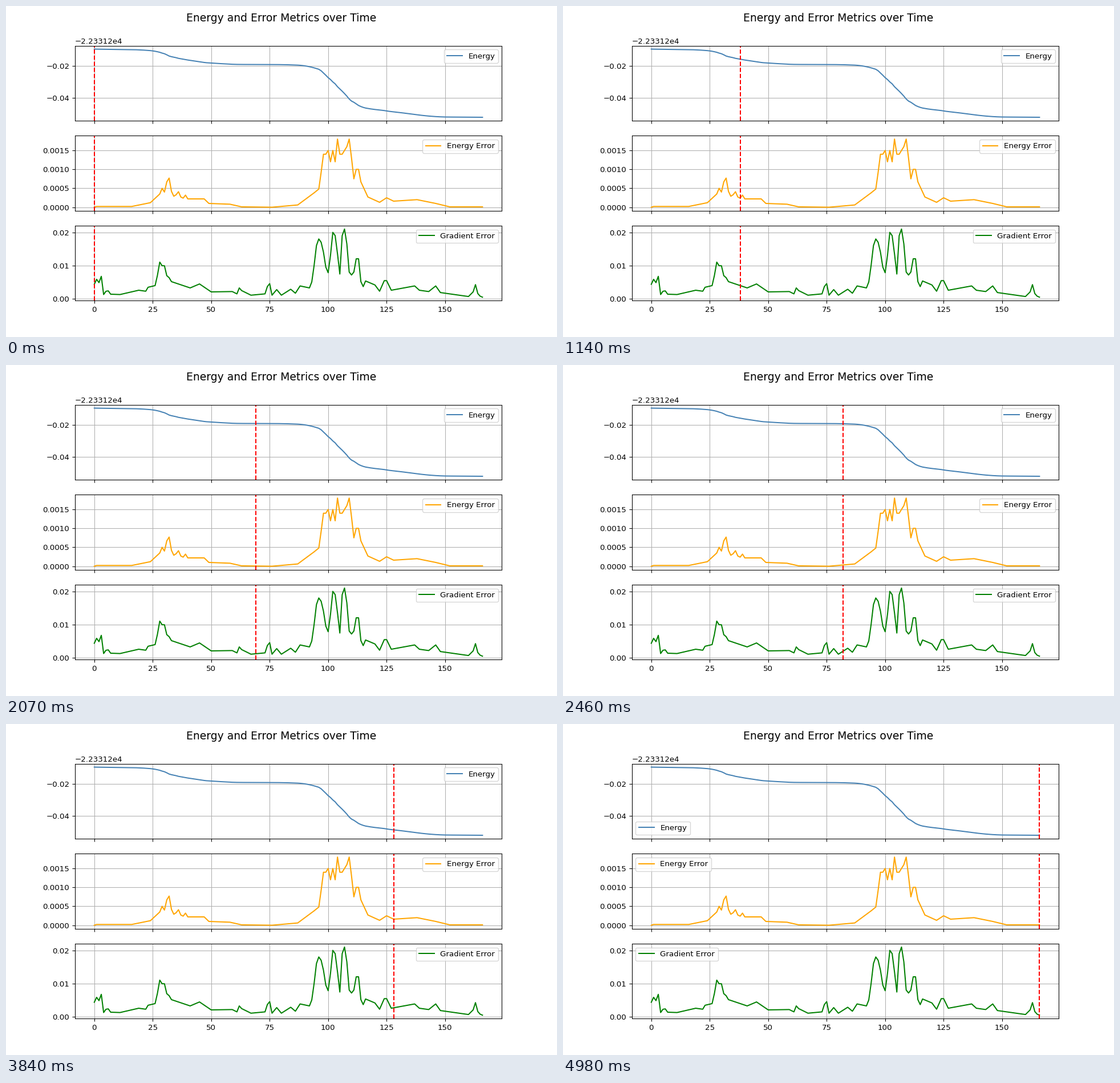
Write a matplotlib script that moves like this. It is 966 px wide and 580 px high and loops after 5010 ms.

```python
import numpy as np
import matplotlib.pyplot as plt
from matplotlib.animation import FuncAnimation

W, H, DPI = 966, 580, 96.6
STEPS = 167
t = np.arange(STEPS)


def trace(knots):
    """Straight lines through knots; a list runs on in steps of one."""
    points = [(x + k, y) for x, ys in knots.items()
              for k, y in enumerate(np.atleast_1d(ys))]
    return np.interp(t, *zip(*points))


energy_err = 1e-5 * trace({
    16: 2, 24: 12,
    28: [35, 50, 40, 67, 77, 42, 29, 33, 41, 27, 24, 32, 22],
    47: 22, 49: 10, 58: 8, 63: 1, 76: 0, 87: 6, 94: 38,
    96: [48, 92, 140, 140, 150, 120, 150, 120, 180, 140,
         140, 150, 160, 180, 130, 75, 100, 100, 67],
    117: 27, 122: 13, 125: 25, 128: 16, 138: 20, 146: 10, 152: 1,
})
energy_err[0] = 0

grad_err = 1e-4 * trace({
    0: [43, 58, 48, 67, 12, 22, 23, 13],
    11: 12, 19: 25, 22: 22, 23: 34,
    26: [39, 70, 110, 99, 99, 69, 63, 51],
    41: 32, 45: 44, 50: 20, 59: 21, 61: [14, 32, 24],
    67: 10, 73: [14, 36, 45, 10], 78: 27, 80: 10,
    84: 28, 86: 16, 88: 38,
    92: [32, 50, 100, 160, 180, 170, 140, 95, 78, 130, 200, 190, 135,
         74, 190, 210, 165, 80, 71, 80, 120, 120, 51, 36, 53],
    120: 41, 122: 22, 124: [54, 54], 127: 25,
    137: 38, 139: 25, 143: 21, 146: 38, 148: 18,
    160: 6, 162: [20, 42, 15, 7, 4],
})

# The error is the energy lost in each step
energy = -22331.2093 - np.cumsum(energy_err)

# A hair over the pixel size, so rounding down stays exact
fig, axes = plt.subplots(3, 1, sharex=True, dpi=DPI,
                         figsize=((W + 1e-6) / DPI, (H + 1e-6) / DPI))
fig.suptitle("Energy and Error Metrics over Time", fontsize=14)

series = [
    (energy, "steelblue", "Energy"),
    (energy_err, "orange", "Energy Error"),
    (grad_err, "green", "Gradient Error"),
]
cursors = []
for ax, (y, color, label) in zip(axes, series):
    ax.plot(t, y, color=color, label=label)
    cursors.append(ax.axvline(0, color="red", linestyle="--"))
    ax.grid(True)
    ax.legend(loc="best")  # moves left once the cursor reaches it


def update(i):
    for cursor in cursors:
        cursor.set_xdata([i, i])
    return cursors


anim = FuncAnimation(fig, update, frames=STEPS, interval=30,
                     repeat=True, repeat_delay=0, blit=False)
plt.show()
```
